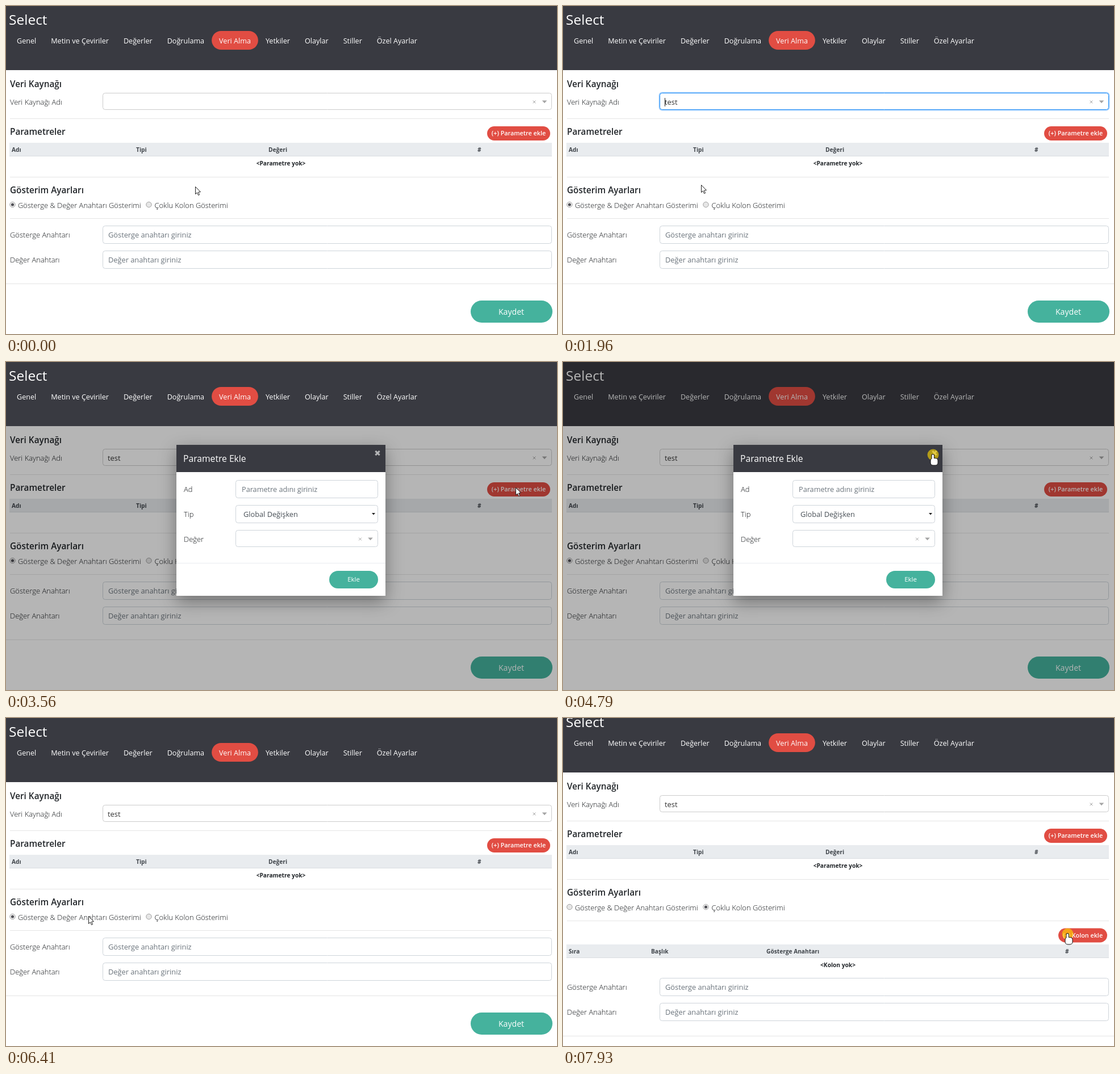
Recreate the animation shown at these times as an HTML page with a canvas. Size 970 by 578 pixels, loop 8000 ms.

```html
<!DOCTYPE html>
<html lang="tr">
<head>
<meta charset="utf-8">
<title>Select</title>
<style>
html, body { margin: 0; width: 100%; height: 100%; overflow: hidden; background: #fff; }
canvas { display: block; width: 970px; height: 578px; }
</style>
</head>
<body>
<canvas id="stage" width="970" height="578"></canvas>
<script>
const ctx = document.getElementById("stage").getContext("2d");
const W = 970, H = 578, LOOP = 8000, HOLD = 200;
const FAMILY = '"Open Sans", "Noto Sans", sans-serif';
const RED = "#e14d43", GREEN = "#45b29d", BLUE = "#3858a8", DARK = "#393a41";
const INK = "#212529", MUTED = "#6c757d", LINE = "#e5e5e5", ICON = "#a4a4a4";
const BAR = 113, ROW = 44, SCROLL = 17;

// Pointer journeys: each leaves the previous stop and ends with an optional click.
const START = { x: 333, y: 318 };
const go = (leave, arrive, x, y, click = false, hand = false) => ({ leave, arrive, x, y, click, hand });
const toSelect = go(100, 1060, 256, 168, true);
const toOption = go(1260, 1460, 246, 199, true, true);
const toRest = go(1660, 1960, 243, 315);
const toAdd = go(2060, 2760, 897, 221, true, true);
const toClose = go(3560, 4690, 651, 163, true, true);
const toIdle = go(5090, 5890, 283, 320);
const toLabel = go(5890, 6410, 145, 349);
const toRadio = go(6410, 6630, 250, 350, true);
const toColumn = go(6930, 7800, 888, 380, true, true);
const MOVES = [toSelect, toOption, toRest, toAdd, toClose, toIdle, toLabel, toRadio, toColumn];

const done = move => move.arrive + HOLD;
const ramp = (t, a, b) => Math.min(1, Math.max(0, (t - a) / (b - a)));
const smooth = u => u * u * (3 - 2 * u);

function pointerAt(t) {
  return MOVES.reduce((p, m) => {
    const u = smooth(ramp(t, m.leave, m.arrive));
    return { x: p.x + (m.x - p.x) * u, y: p.y + (m.y - p.y) * u };
  }, START);
}

function text(str, x, y, size, color = INK, weight = 400, align = "left") {
  ctx.font = `${weight} ${size}px ${FAMILY}`;
  ctx.textAlign = align;
  ctx.fillStyle = color;
  ctx.fillText(str, x, y);
}

const heading = (str, y) => text(str, 7, y, 15.3, INK, 600);
const label = (str, x, y) => text(str, x, y, 12.95, "#15181b", 300);

function rect(x, y, w, h, color) {
  ctx.fillStyle = color;
  ctx.fillRect(x, y, w, h);
}

const rule = y => rect(7, y, 954, 1, LINE);

function paint(fill, stroke, width = 1) {
  if (fill) {
    ctx.fillStyle = fill;
    ctx.fill();
  }
  if (stroke) {
    ctx.strokeStyle = stroke;
    ctx.lineWidth = width;
    ctx.stroke();
  }
}

function box(x, y, w, h, r, fill, stroke, width) {
  ctx.beginPath();
  ctx.roundRect(x, y, w, h, r);
  paint(fill, stroke, width);
}

const pill = (x, y, w, h, color) => box(x, y, w, h, h / 2, color);
const field = (x, y, w, h, border = "#ced4da") => box(x + .5, y + .5, w, h, 4, "#fff", border);

function disc(x, y, r, fill, stroke) {
  ctx.beginPath();
  ctx.arc(x, y, r, 0, Math.PI * 2);
  paint(fill, stroke);
}

function shape(points, fill, stroke) {
  ctx.beginPath();
  points.forEach(([x, y]) => ctx.lineTo(x, y));
  ctx.closePath();
  paint(fill, stroke);
}

const chevron = (x, y, r, color) => shape([[x - r, y], [x + r, y], [x, y + r + .5]], color);

function cross(x, y, r, width, color) {
  ctx.beginPath();
  for (const s of [-1, 1]) {
    ctx.moveTo(x - r, y - s * r);
    ctx.lineTo(x + r, y + s * r);
  }
  paint(null, color, width);
}

function selectIcons(x, y) {
  cross(x, y + .5, 2.4, 1, ICON);
  chevron(x + 18, y - 2, 4.3, ICON);
}

function radio(x, y, on) {
  disc(x, y, 4.7, on ? "#f4f4f4" : "#e6e6e6", "#a0a0a0");
  if (on) disc(x, y, 2.6, "#505056");
}

function table(y, columns, empty) {
  rect(6, y, 955, 24, "#e9ecef");
  rect(6, y + 23, 955, 1, "#d9dde1");
  for (const [name, x] of Object.entries(columns)) text(name, x, y + 16, 10.2, "#3f444a", 700);
  text(empty, 484, y + 39.5, 10.2, INK, 700, "center");
}

function addButton(str, w, y, color = RED) {
  pill(958 - w, y, w, 25, color);
  text(str, 958 - w / 2, y + 16, 10.8, "#fff", 600, "center");
}

function header() {
  rect(0, 0, W, BAR, DARK);
  text("Select", 5, 33, 24.5, "#fff");
  const tabs = ["Genel", "Metin ve Çeviriler", "Değerler", "Doğrulama", "Veri Alma",
    "Yetkiler", "Olaylar", "Stiller", "Özel Ayarlar"];
  const pad = 13;
  let x = 6;
  for (const tab of tabs) {
    ctx.font = `400 12.6px ${FAMILY}`;
    const width = ctx.measureText(tab).width + 2 * pad;
    if (tab === "Veri Alma") pill(x, 44, width, 33, RED);
    text(tab, x + pad, 65.5, 12.6, "#fff");
    x += width;
  }
}

function sourceSelect(t) {
  const focused = t >= toSelect.arrive && t < done(toAdd);
  const chosen = t >= done(toOption);
  if (focused) box(169.5, 152.5, 792, 31, 5, null, "rgba(0,126,255,.35)", 2);
  field(170, 153, 790, 29, focused ? "#1f8cf5" : "#ccc");
  if (chosen) text("test", 179, 173.5, 12.9, "#333");
  const blinkStart = chosen ? done(toOption) : toSelect.arrive;
  if (focused && (t - blinkStart) % 1000 < 500) rect(179, 162, 1, 15, "#222");
  selectIcons(930, 168.5);
}

function dropdown() {
  field(170, 182, 790, 34, "#ccc");
  rect(171, 183, 789, 33, "#ebf5ff");
  text("test", 180, 204, 12.9, "#333");
}

function page(t, columns) {
  heading("Veri Kaynağı", 143);
  label("Veri Kaynağı Adı", 7, 174);
  sourceSelect(t);
  rule(198);

  heading("Parametreler", 227);
  const hovered = t >= done(toAdd) && t < done(toAdd) + 2 * HOLD;
  addButton("(+) Parametre ekle", 111, 212, hovered ? BLUE : RED);
  table(241, { "Adı": 10, "Tipi": 229, "Değeri": 462, "#": 830 }, "<Parametre yok>");
  rule(301);

  heading("Gösterim Ayarları", 330);
  const multi = t >= toRadio.arrive + HOLD / 2;
  radio(11.5, 350, !multi);
  radio(251.5, 350, multi);
  label("Gösterge & Değer Anahtarı Gösterimi", 21, 355.5);
  label("Çoklu Kolon Gösterimi", 261.5, 355.5);
  rule(374);

  ctx.save();
  if (columns) {
    addButton("(+) Kolon ekle", 86, 387.5);
    table(416, { "Sıra": 10, "Başlık": 155, "Gösterge Anahtarı": 358, "#": 884 }, "<Kolon yok>");
    ctx.translate(0, 2 * ROW);
  }
  ["Gösterge", "Değer"].forEach((name, i) => {
    const y = 387 + i * ROW;
    label(`${name} Anahtarı`, 7, y + 21);
    field(170, y, 790, 31);
    text(`${name} anahtarı giriniz`, 180, y + 21, 12.8, MUTED);
  });
  rect(0, 489, W, 1, LINE);
  pill(818, 519, 144, 39, GREEN);
  text("Kaydet", 889.5, 544, 14.1, "#fff", 400, "center");
  ctx.restore();
}

function modal(alpha) {
  ctx.save();
  ctx.globalAlpha = alpha;
  ctx.shadowColor = "rgba(0,0,0,.38)";
  ctx.shadowBlur = 28;
  ctx.shadowOffsetY = 10;
  rect(300, 146, 368, 266, "#fff");
  ctx.shadowColor = "transparent";
  rect(300, 146, 368, 48, DARK);
  text("Parametre Ekle", 312, 175.5, 15.7, "#fff");
  cross(654, 160.5, 3.6, 3, "#b4b4b6");

  ["Ad", "Tip", "Değer"].forEach((name, i) => {
    const y = 208 + i * ROW;
    label(name, 313, y + 21);
    field(404, y, 250, name === "Değer" ? 29 : 31);
  });
  text("Parametre adını giriniz", 415, 229, 12.7, MUTED);
  text("Global Değişken", 418, 273, 12.75, "#495057");
  chevron(647, 266, 3, "#222");
  selectIcons(623.5, 311.5);

  rect(300, 354, 368, 1, "#e9ecef");
  pill(569, 368, 86, 31, GREEN);
  text("Ekle", 612, 387, 11.4, "#fff", 400, "center");
  ctx.restore();
}

function arrow() {
  shape([[.5, .5], [.5, 13.5], [3.4, 10.8], [5.6, 15.5], [7.6, 14.6], [5.5, 10.1], [9.4, 9.6]], "#fff", "#222");
}

function hand() {
  ctx.beginPath();
  ctx.roundRect(-1.5, 0, 3.4, 12, 1.7);
  ctx.roundRect(-3.5, 7, 12, 11.5, 4);
  paint(null, "#111", 2);
  paint("#fff");
}

function pointer(t) {
  const { x, y } = pointerAt(t);
  const over = (m, lead) => t >= m.arrive - lead && t < done(m);
  ctx.save();
  ctx.translate(Math.round(x), Math.round(y));
  if (MOVES.some(m => m.click && over(m, 0))) disc(.5, .5, 10, "rgba(255,216,0,.62)");
  MOVES.some(m => m.hand && over(m, HOLD)) ? hand() : arrow();
  ctx.restore();
}

function draw(t) {
  const open = t >= done(toAdd) && t < done(toClose);
  const columns = t >= done(toRadio);

  rect(0, 0, W, H, "#fff");
  ctx.save();
  ctx.translate(0, -Math.round(SCROLL * ramp(t, done(toRadio) + HOLD, done(toRadio) + 2 * HOLD)));
  header();
  page(t, columns);
  if (t >= toSelect.arrive + HOLD / 2 && t < done(toOption)) dropdown();
  ctx.restore();

  if (open) {
    // The content dims soon after opening, the bar only as the close button is reached.
    const opened = done(toAdd);
    rect(0, BAR, W, H - BAR, `rgba(0,0,0,${.29 * ramp(t, opened + HOLD, opened + 2 * HOLD)})`);
    if (t >= toClose.arrive - HOLD) rect(0, 0, W, BAR, "rgba(0,0,0,.29)");
    modal(ramp(t, opened - HOLD / 2, opened + HOLD / 2));
  }
  pointer(t);
}

let origin;
function tick(now) {
  origin ??= now;
  draw((now - origin) % LOOP);
  requestAnimationFrame(tick);
}
draw(0);
requestAnimationFrame(tick);
</script>
</body>
</html>
```
